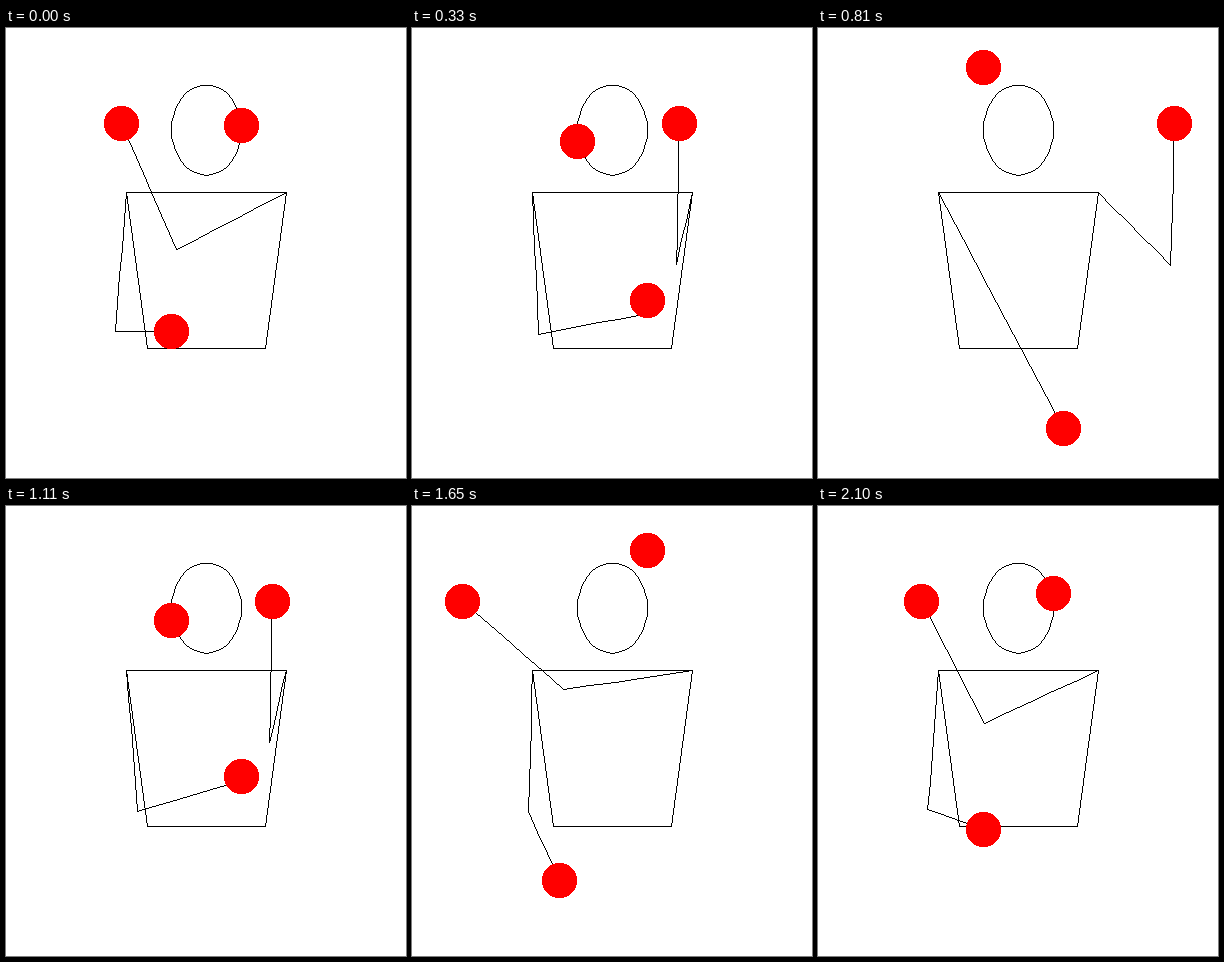
Write an HTML page with a canvas that moves like this. It is 400x450 px and loops after 2.13 s.

```html
<!DOCTYPE html>
<html lang="en">
<head>
<meta charset="utf-8">
<title>Juggler</title>
<style>
  html, body { margin: 0; width: 100%; height: 100%; overflow: hidden; background: #fff; }
  canvas { display: block; }
</style>
</head>
<body>
<canvas id="stage" width="400" height="450"></canvas>
<script>
const ctx = document.getElementById('stage').getContext('2d');

// Lengths in cm, times in ms.
const LOOP = 2130, HALF = LOOP / 2, STEP = 30;
const SCALE = 3.465, CENTER_X = 200, BASE_Y = 302.6;
const RISE = 718.9, PEAK = 77.2, THROW_SPEED = 2 * PEAK / RISE;
const EMPTY = 2 * RISE - HALF, DWELL = HALF - EMPTY;
const COLUMN = 10, CARRY_X = 40, CARRY_Z = 60;
const SHOULDER_X = 23, SHOULDER_Z = 40, ARM = 41, REACH = 30;

const mod = (a, n) => ((a % n) + n) % n;
const px = x => Math.round(CENTER_X + x * SCALE);
const py = z => Math.round(BASE_Y - z * SCALE);

// Cubic Hermite segment of duration d.
function hermite(t, d, from, to, v0, v1) {
  const u = t / d, w = u * u * (3 - 2 * u);
  return from + (to - from) * w + d * (v0 * u * (1 - u) * (1 - u) - v1 * u * u * (1 - u));
}

// Low hand: throws up one column, swings over and catches in the other.
const SWING = 3 * COLUMN * DWELL / (EMPTY * HALF);
function lowHand(t) {
  const side = t < HALF ? 1 : -1, p = mod(t, HALF);
  const sink = -THROW_SPEED / 2;
  if (p < EMPTY) return {
    x: side * hermite(p, EMPTY, -COLUMN, COLUMN, 0, SWING),
    z: hermite(p, EMPTY, 0, 0, THROW_SPEED, sink)
  };
  return {
    x: side * hermite(p - EMPTY, DWELL, COLUMN, COLUMN, SWING, 0),
    z: hermite(p - EMPTY, DWELL, 0, 0, sink, THROW_SPEED)
  };
}

// High hand: carries one ball from side to side.
const CARRY_V = 6 * CARRY_X / DWELL / (DWELL / EMPTY + 3);
function highHand(t) {
  const q = mod(t - HALF / 2, LOOP), side = q < HALF ? 1 : -1, p = mod(q, HALF);
  const x = p < EMPTY
    ? hermite(p, EMPTY, CARRY_X, CARRY_X, CARRY_V, -CARRY_V)
    : hermite(p - EMPTY, DWELL, CARRY_X, -CARRY_X, -CARRY_V, -CARRY_V);
  return { x: side * x, z: CARRY_Z };
}

function tossedBall(t, side) {
  const p = mod(t - (side > 0 ? HALF : 0), LOOP);
  if (p >= 2 * RISE) return lowHand(t);
  return { x: side * COLUMN, z: PEAK * (1 - ((p - RISE) / RISE) ** 2) };
}

// The elbow hangs in the vertical plane through shoulder and hand.
function elbow(shoulderX, hand) {
  const dx = hand.x - shoulderX, dz = hand.z - SHOULDER_Z;
  const dist = Math.hypot(dx, dz, REACH);
  if (dist > 2 * ARM) return null;
  const drop = Math.sqrt(ARM * ARM - dist * dist / 4);
  const tilt = Math.asin(dz / dist);
  const out = 0.5 + drop * Math.tan(tilt) / dist;
  return { x: shoulderX + dx * out, z: SHOULDER_Z + dz / 2 - drop * Math.cos(tilt) };
}

// One-pixel line without smoothing.
function line(x0, y0, x1, y1) {
  const dx = Math.abs(x1 - x0), dy = -Math.abs(y1 - y0);
  const sx = Math.sign(x1 - x0), sy = Math.sign(y1 - y0);
  let err = dx + dy;
  for (;;) {
    ctx.fillRect(x0, y0, 1, 1);
    if (x0 === x1 && y0 === y1) return;
    const e = 2 * err;
    if (e >= dy) { err += dy; x0 += sx; }
    if (e <= dx) { err += dx; y0 += sy; }
  }
}

function polygon(points) {
  points.forEach((a, i) => line(...a, ...points[(i + 1) % points.length]));
}

// Limbs are drawn in short slices with rounded ends.
function limb(a, b, slices = 5) {
  const at = i => {
    const k = i / slices;
    return [px(a.x + (b.x - a.x) * k), py(a.z + (b.z - a.z) * k)];
  };
  for (let i = 0; i < slices; i++) line(...at(i), ...at(i + 1));
}

function arm(shoulderX, hand) {
  const shoulder = { x: shoulderX, z: SHOULDER_Z }, joint = elbow(shoulderX, hand);
  if (!joint) return limb(shoulder, hand);
  limb(shoulder, joint);
  limb(joint, hand);
}

function ball({ x, z }) {
  const cx = px(x), cy = py(z);
  for (let dy = -17; dy <= 17; dy++) {
    const half = Math.floor(Math.sqrt(17.5 * 17.5 - dy * dy));
    ctx.fillRect(cx - half, cy + dy, 2 * half + 1, 1);
  }
}

const torso = [[-23, 40], [23, 40], [17, -5], [-17, -5]].map(([x, z]) => [px(x), py(z)]);
const head = Array.from({ length: 40 }, (_, i) => {
  const a = i * Math.PI / 20;
  return [Math.round(200 + 35 * Math.cos(a)), Math.floor(102.01 - 45 * Math.sin(a))];
});

function draw(t) {
  const low = lowHand(t), high = highHand(t);
  ctx.fillStyle = '#fff';
  ctx.fillRect(0, 0, 400, 450);
  ctx.fillStyle = '#000';
  polygon(torso);
  polygon(head);
  arm(-SHOULDER_X, low);
  arm(SHOULDER_X, high);
  ctx.fillStyle = '#f00';
  [tossedBall(t, -1), tossedBall(t, 1), high].forEach(ball);
}

const start = performance.now();
function tick() {
  const elapsed = performance.now() - start;
  draw(Math.floor((elapsed + 1) / STEP) * STEP % LOOP);
  requestAnimationFrame(tick);
}
tick();
</script>
</body>
</html>
```
